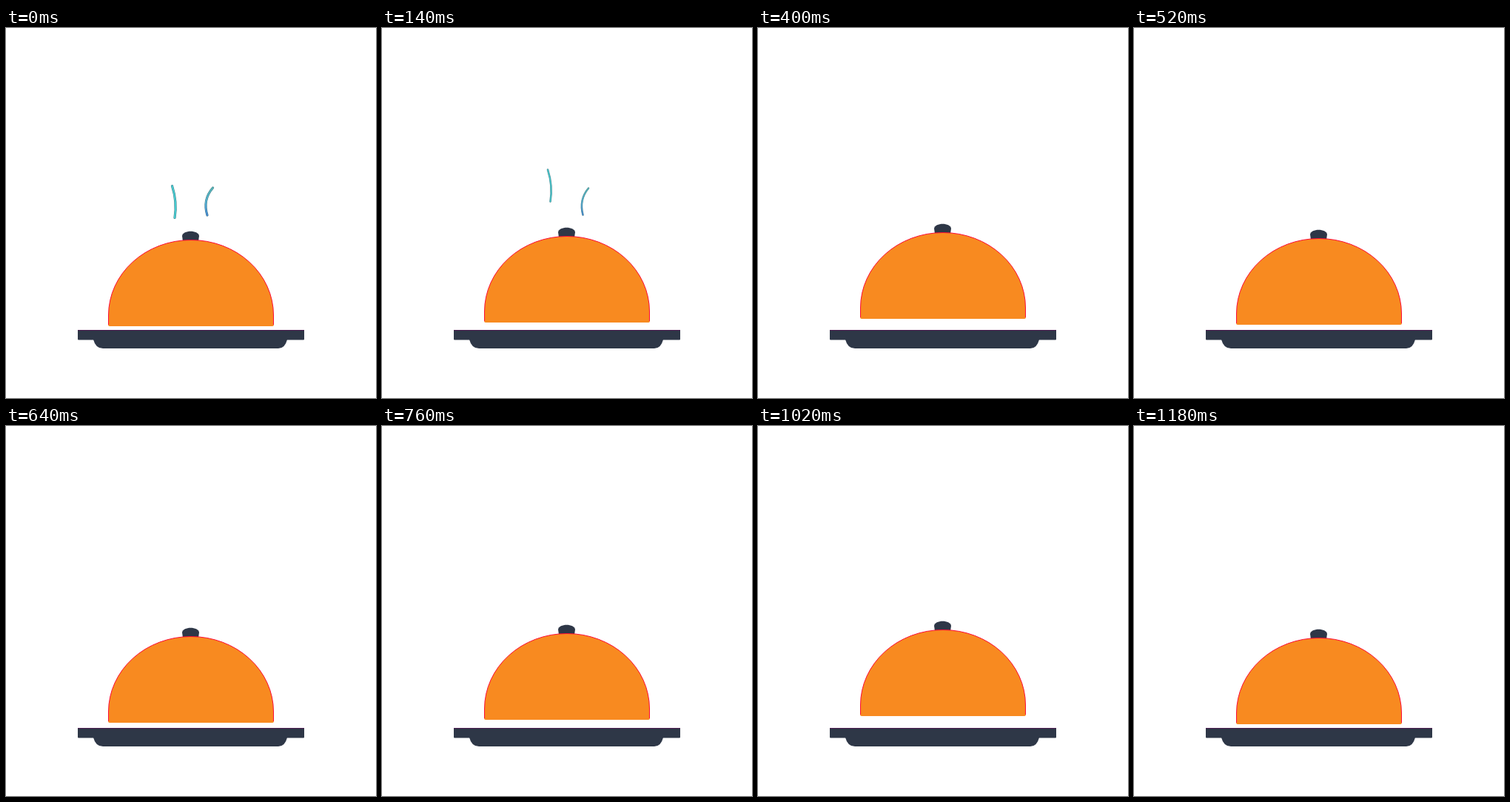
Write an HTML page with a canvas that moves like this. It is 500 px wide and 500 px high and loops after 1260 ms.

```html
<!DOCTYPE html>
<html lang="en">
<head>
<meta charset="utf-8">
<title>Serving dish</title>
<style>
  html, body { margin: 0; width: 100%; height: 100%; overflow: hidden; background: #fff; }
  canvas { display: block; width: 500px; height: 500px; }
</style>
</head>
<body>
<canvas id="stage" width="500" height="500"></canvas>
<script>
const ctx = document.getElementById('stage').getContext('2d');
const LOOP = 1260, STEP = 20, HOP = 315;
const DARK = '#2e3747', ORANGE = '#f88a20', RED = '#fb0a35', PLUM = '#4b1c50';

// Lid height over one hop: [ms, px]
const HOP_KEYS = [[0, 0], [50, 12], [75, 11], [135, 5], [205, 2], [235, 0], [HOP, 0]];

function interpolate(keys, t) {
  const i = keys.findIndex(key => key[0] > t);
  const [t0, v0] = keys[i - 1], [t1, v1] = keys[i];
  return v0 + (v1 - v0) * (t - t0) / (t1 - t0);
}

function wisp(x0, y0, cx, cy, x1, y1, width, color) {
  for (const [w, c] of [[width, '#4b7f88'], [width - 1, color]]) {
    ctx.lineWidth = w;
    ctx.strokeStyle = c;
    ctx.beginPath();
    ctx.moveTo(x0, y0);
    ctx.quadraticCurveTo(cx, cy, x1, y1);
    ctx.stroke();
  }
}

function drawSteam(t) {
  if (t > 160) return;
  const p = t / 140, rise = 22 * p, width = 3.2 - 0.7 * p;
  ctx.lineCap = 'round';
  wisp(224.5 - p / 2, 213.5 - rise, 231.5 - p / 2, 235 - rise, 228 - p / 2, 256.5 - rise, width, '#46cbd0');

  const tint = ctx.createLinearGradient(0, 216, 0, 254);
  tint.addColorStop(0, '#55b4b5');
  tint.addColorStop(0.5, '#53b0d2');
  tint.addColorStop(1, '#4384d2');
  wisp(279.5 - p / 2, 216 + p / 2, 265.5 + p / 2, 232, 272 - p / 2, 253 - p / 2, width, tint);
}

function drawPlate() {
  ctx.fillStyle = DARK;
  ctx.beginPath();
  ctx.roundRect(97, 408, 306, 13.5, 1);
  ctx.fill();
  ctx.beginPath();
  ctx.moveTo(118, 421);
  ctx.quadraticCurveTo(121, 433, 131, 433);
  ctx.lineTo(368, 433);
  ctx.quadraticCurveTo(377, 433, 380, 421);
  ctx.fill();
  ctx.fillStyle = PLUM;
  ctx.fillRect(97, 408, 306, 1);
}

function drawLid(lift) {
  ctx.save();
  ctx.translate(0, -lift);

  ctx.fillStyle = DARK;
  ctx.beginPath();
  ctx.moveTo(239, 288);
  ctx.lineTo(238, 281);
  ctx.bezierCurveTo(239, 272.7, 260, 272.7, 261, 281);
  ctx.lineTo(260, 288);
  ctx.fill();

  const dome = new Path2D();
  dome.moveTo(138.5, 401);
  dome.lineTo(138.5, 388);
  dome.ellipse(250, 388, 111.5, 101.5, 0, Math.PI, 2 * Math.PI);
  dome.lineTo(361.5, 401);
  ctx.fillStyle = ORANGE;
  ctx.fill(dome);
  ctx.beginPath();
  ctx.roundRect(138, 388, 224, 15, [0, 0, 2, 2]);
  ctx.fill();
  ctx.lineCap = 'butt';
  ctx.lineWidth = 1;
  ctx.strokeStyle = RED;
  ctx.stroke(dome);
  ctx.restore();
}

function draw(now) {
  const t = Math.floor((now % LOOP) / STEP) * STEP;
  ctx.fillStyle = '#fff';
  ctx.fillRect(0, 0, 500, 500);
  drawSteam(t);
  drawPlate();
  drawLid(Math.round(interpolate(HOP_KEYS, t % HOP)));
}

let start;
function tick(now) {
  start ??= now;
  draw(now - start);
  requestAnimationFrame(tick);
}
draw(0);
requestAnimationFrame(tick);
</script>
</body>
</html>
```
